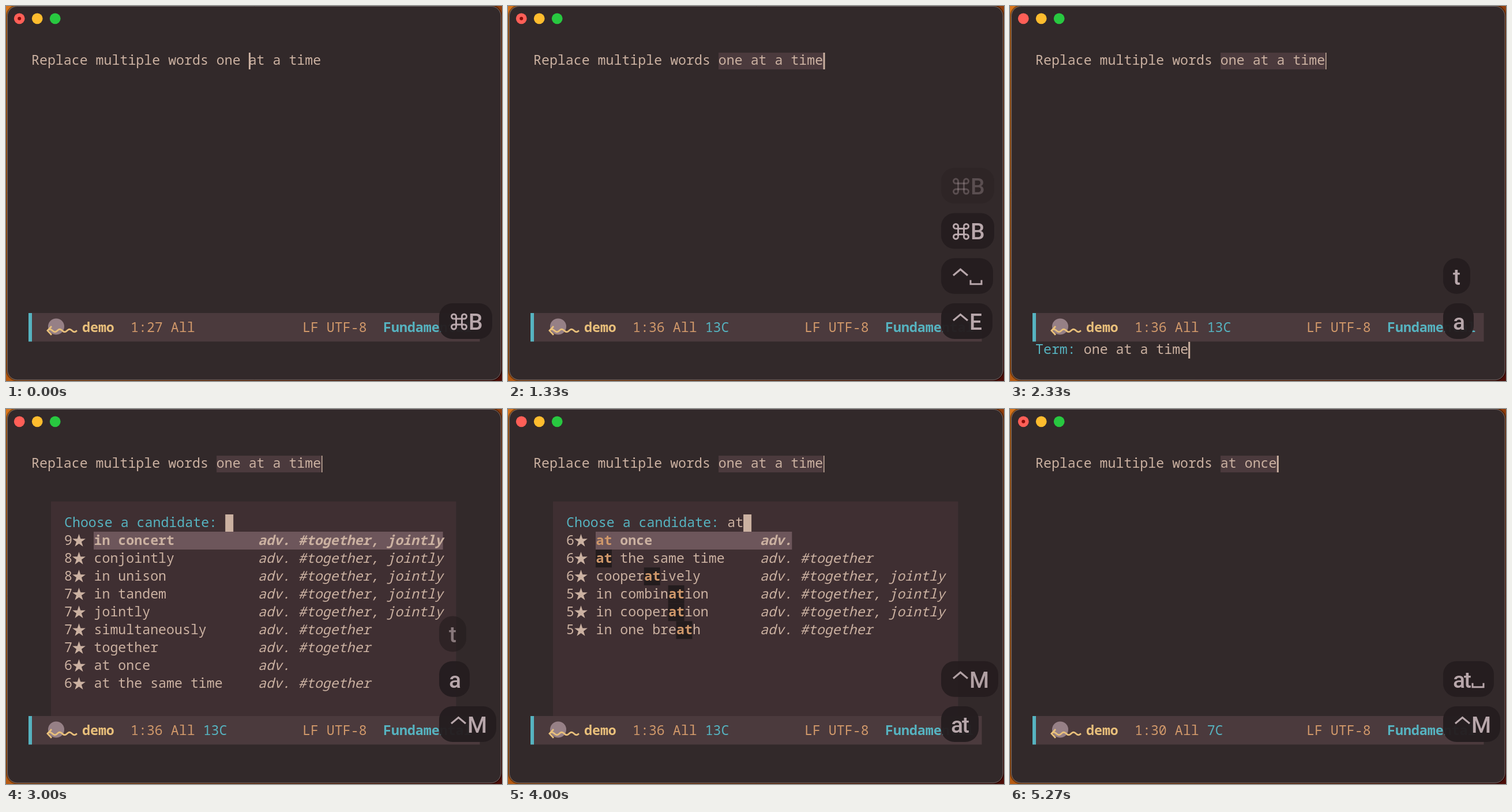
These frames come from a looping animation (860 by 651 pixels, 5.87 s). An HTML page with a canvas:

```html
<!DOCTYPE html>
<html>
<head>
<meta charset="utf-8">
<style>
  html, body { margin: 0; width: 100%; height: 100%; overflow: hidden; background: #32292a; }
  canvas { display: block; }
</style>
</head>
<body>
<canvas id="stage" width="860" height="651"></canvas>
<script>
const ctx = document.getElementById('stage').getContext('2d');
const LOOP = 5870, CELL = 13.96, LEFT = 44;
const C = {
  window: '#32292a', bar: '#4b3a3d', popup: '#3f2f32', selected: '#6d565b', match: '#231c1d',
  text: '#cbb1a1', cyan: '#56b3c0', yellow: '#e9c07b', orange: '#d0986a',
  heading: '#d5643a', hotkey: '#f0862f', cap: '#251d1f', capText: '#bdabaf'
};

const together = '#together', both = '#together, jointly';
const allWords = [
  [9, 'in concert', both], [8, 'conjointly', both], [8, 'in unison', both],
  [7, 'in tandem', both], [7, 'jointly', both], [7, 'simultaneously', together],
  [7, 'together', together], [6, 'at once', ''], [6, 'at the same time', together]
];
const atWords = [
  [6, 'at once', ''], [6, 'at the same time', together], [6, 'cooperatively', both],
  [5, 'in combination', both], [5, 'in cooperation', both], [5, 'in one breath', together]
];

// Each scene overrides the one before it; keys run from newest (bottom) to oldest.
const changes = [
  { at: 0, phrase: 'one at a time', col: 27, mark: 0, view: 'edit', query: '', keys: [['⌘B', 1]] },
  { at: 330, col: 23, keys: [['⌘B', 1], ['⌘B', 1]] },
  { at: 670, keys: [['^␣', 1], ['⌘B', 1], ['⌘B', 1]] },
  { at: 1000, col: 36, mark: 13, keys: [['^E', 1], ['^␣', 1], ['⌘B', 1], ['⌘B', 1]] },
  { at: 1330, keys: [['^E', 1], ['^␣', 1], ['⌘B', 1], ['⌘B', .32]] },
  { at: 1670, keys: [['^E', 1], ['^␣', .65], ['⌘B', .32]] },
  { at: 2000, view: 'menu', keys: [['t', 1], ['^E', .65]] },
  { at: 2330, view: 'term', keys: [['a', 1], ['t', 1]] },
  { at: 3000, view: 'list', keys: [['^M', 1], ['a', 1], ['t', .65]] },
  { at: 3330, keys: [['^M', 1], ['a', .65]] },
  { at: 3670, keys: [['^M', 1]] },
  { at: 4000, query: 'at', keys: [['at', 1], ['^M', .95]] },
  { at: 4330, query: 'at ', keys: [['at␣', 1]] },
  { at: 5270, view: 'edit', phrase: 'at once', col: 30, mark: 7, keys: [['^M', 1], ['at␣', 1]] }
];
const scenes = [];
changes.forEach((change, i) => scenes.push({ ...scenes[i - 1], ...change }));

function box(x, y, w, h, color) {
  ctx.fillStyle = color;
  ctx.fillRect(x, y, w, h);
}

function disc(x, y, r, color) {
  ctx.fillStyle = color;
  ctx.beginPath();
  ctx.arc(x, y, r, 0, Math.PI * 2);
  ctx.fill();
}

function rounded(x, y, w, h, r) {
  ctx.beginPath();
  ctx.roundRect(x, y, w, h, r);
}

function line(points, color, width) {
  ctx.strokeStyle = color;
  ctx.lineWidth = width;
  ctx.beginPath();
  points.forEach(([x, y]) => ctx.lineTo(x, y));
  ctx.stroke();
}

function write(string, x, y, color = C.text, style = '500') {
  ctx.font = `${style} ${CELL / 0.6}px "Noto Sans Mono", "DejaVu Sans Mono", monospace`;
  ctx.fillStyle = color;
  ctx.fillText(string, x, y);
}

function star(x, y, r) {
  ctx.fillStyle = C.text;
  ctx.beginPath();
  for (let i = 0; i < 10; i++) {
    const angle = (i / 5 - 0.5) * Math.PI, d = i % 2 ? r * 0.39 : r;
    ctx.lineTo(x + d * Math.cos(angle), y + d * Math.sin(angle));
  }
  ctx.fill();
}

function drawWindow(modified) {
  const desktop = ctx.createLinearGradient(0, 0, 860, 651);
  desktop.addColorStop(0, '#d9761c');
  desktop.addColorStop(0.5, '#a8500f');
  desktop.addColorStop(1, '#4c0d08');
  box(0, 0, 860, 651, desktop);
  rounded(2.5, 0.5, 855.5, 648.5, 17);
  ctx.strokeStyle = 'rgba(0, 0, 0, .35)';
  ctx.lineWidth = 5;
  ctx.stroke();
  ctx.fillStyle = C.window;
  ctx.fill();
  ctx.strokeStyle = '#746a6a';
  ctx.lineWidth = 1;
  ctx.stroke();
  ['#ff5f57', '#febc2e', '#28c840'].forEach((color, i) => disc(23.2 + 31 * i, 21.8, 9.4, color));
  if (modified) disc(23.2, 21.8, 3, '#8a0d08');
}

function drawBuffer({ phrase, col, mark, view }) {
  const start = LEFT + 23 * CELL, cursor = LEFT + col * CELL;
  if (mark) box(start, 81, mark * CELL, 29, C.bar);
  write('Replace multiple words ' + phrase, LEFT, 102);
  const active = view === 'edit' || view === 'menu';
  box(active ? cursor : cursor + 0.5, 81, active ? 3 : 1.5, 29, C.text);
}

function drawModeline(y, { col, mark }) {
  box(39, y, 782.5, 49.5, C.bar);
  box(39, y, 6, 49.5, C.cyan);
  disc(87, y + 23.5, 14, '#968086');
  line([[79, y + 23], [72, y + 30.5], [79, y + 38]], C.yellow, 2.8);
  const wave = [];
  for (let x = 72; x <= 123; x++) wave.push([x, y + 30.5 - 2.3 * Math.sin((x - 72) / 2.7)]);
  line(wave, C.yellow, 2.8);
  const base = y + 32.5;
  write('demo', 132, base, C.yellow, 'bold');
  write(`1:${col} All`, 216, base, C.orange);
  if (mark) write(mark + 'C', 216 + 9 * CELL, base, C.cyan);
  write('LF UTF-8', 514, base, C.orange);
  write('Fundamental', 654, base, C.cyan, 'bold');
}

function drawMenu() {
  const column = (first, rows) => rows.forEach(([key, label], i) => {
    const y = 514 + 29.6 * i;
    write(key, LEFT + first * CELL, y, C.hotkey, 'bold');
    write(label, LEFT + (first + 2) * CELL, y);
  });
  box(43.5, 462.5, 14, 30, C.text);
  write('Similarity', LEFT + CELL, 484.5, C.heading);
  write('Information', LEFT + 19 * CELL, 484.5, C.heading);
  column(2, [['s', 'Synonyms'], ['a', 'Antonyms'], ['r', 'Related Words']]);
  column(20, [['d', 'Definitions'], ['e', 'Example Sentences']]);
  box(43, 581, 777, 1, '#6b5c5c');
}

function drawTerm() {
  write('Term:', LEFT, 604, C.cyan);
  write('one at a time', LEFT + 6 * CELL, 604);
  box(LEFT + 19 * CELL, 583, 3, 29, C.text);
}

function drawList(query) {
  const x = 101, wordX = 152.5, noteX = 437;
  box(78, 160.5, 702.5, 372.5, C.popup);
  write('Choose a candidate: ', x, 205, C.cyan);
  write(query, x + 20 * CELL, 205);
  box(x + (20 + query.length) * CELL, 183, 14, 30, C.text);
  (query ? atWords : allWords).forEach(([score, word, tags], i) => {
    const top = 213 + 31.05 * i, base = top + 23, weight = i ? '500' : 'bold';
    const note = ('adv. ' + tags).trim();
    if (!i) box(wordX - 0.5, top, noteX - wordX + note.length * CELL, 31, C.selected);
    write(score, x, base);
    star(126.5, top + 16, 12);
    write(word, wordX, base, C.text, weight);
    write(note, noteX, base, C.text, 'italic ' + weight);
    if (query) {
      const matchX = wordX + word.indexOf('at') * CELL;
      box(matchX - 0.5, top, 2 * CELL, 31, i ? C.match : C.selected);
      write('at', matchX, base, C.orange, 'bold');
    }
  });
}

function drawCommand(x, y) {
  ctx.save();
  ctx.translate(x, y);
  ctx.lineWidth = 3;
  for (let i = 0; i < 4; i++) {
    ctx.beginPath();
    ctx.arc(9, -9, 4, Math.PI, Math.PI * 2.5);
    ctx.lineTo(-9, -5);
    ctx.stroke();
    ctx.rotate(Math.PI / 2);
  }
  ctx.restore();
}

const capWidths = { '⌘B': 92, '^␣': 90, '^E': 89, '^M': 99, t: 47, a: 53, at: 65, 'at␣': 88 };

function drawKey([label, alpha], slot) {
  const top = 516 - 78.3 * slot;
  let x = 768;
  ctx.globalAlpha = alpha * 0.97;
  rounded(751, top, capWidths[label], 62, 23);
  ctx.fillStyle = C.cap;
  ctx.fill();
  ctx.strokeStyle = ctx.fillStyle = C.capText;
  ctx.font = '500 39px Roboto, Inter, sans-serif';
  for (const char of label) {
    if (char === '⌘') {
      drawCommand(785.5, top + 32);
      x = 802;
    } else if (char === '^') {
      line([[772, top + 30], [784.5, top + 19.5], [797, top + 30]], C.capText, 3.2);
      x = 800;
    } else if (char === '␣') {
      line([[802, top + 38], [802, top + 45], [821, top + 45], [821, top + 38]], C.capText, 3);
    } else {
      ctx.fillText(char, x, top + 46);
      x += ctx.measureText(char).width - 2;
    }
  }
  ctx.globalAlpha = 1;
}

function draw(now) {
  const t = now % LOOP;
  const scene = scenes.findLast(s => s.at <= t);
  const { view, query, keys } = scene;
  drawWindow(view === 'edit' || view === 'menu');
  drawBuffer(scene);
  if (view === 'list') drawList(query);
  drawModeline(view === 'menu' ? 413.5 : 533, scene);
  if (view === 'menu') drawMenu();
  if (view === 'term') drawTerm();
  keys.forEach(drawKey);
  requestAnimationFrame(draw);
}
requestAnimationFrame(draw);
</script>
</body>
</html>
```
